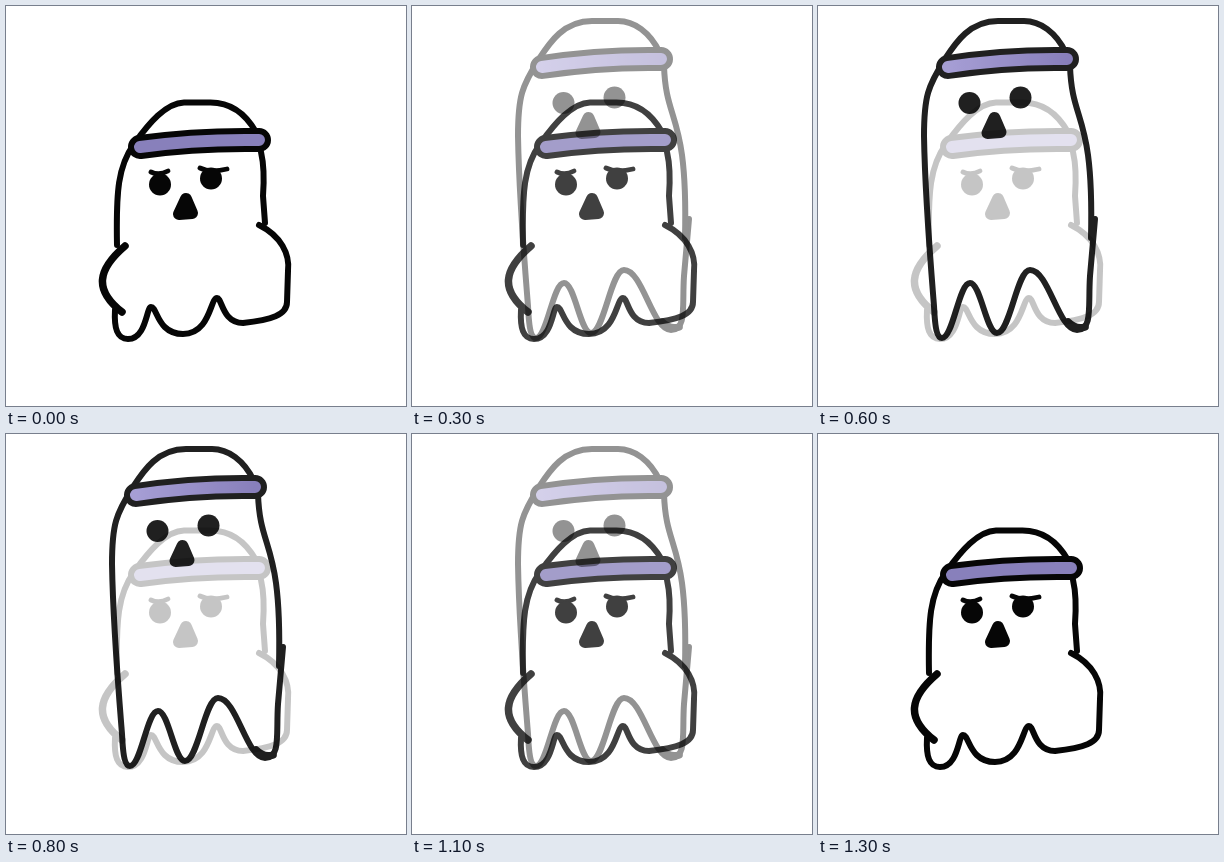
Animation of 400 by 400 pixels, one loop 1.5 s. Source, as an HTML page:

```html
<!DOCTYPE html>
<html lang="en">
<head>
<meta charset="utf-8">
<title>Ghost</title>
<style>
html, body { margin: 0; width: 100%; height: 100%; overflow: hidden; background: #fff; }
svg { display: block; width: 100vw; height: 100vh; }
path { fill: none; stroke: #060606; stroke-width: 6; stroke-linecap: round; stroke-linejoin: round; }
circle { fill: #060606; }
.thick { stroke-width: 7.5; }
.brow { stroke-width: 4.8; }
.rim { stroke-width: 24; }
.cloth { stroke-width: 12; }
.mouth { fill: #060606; stroke-width: 12; }
</style>
</head>
<body>
<svg viewBox="0 0 400 400">
  <defs>
    <linearGradient id="shine">
      <stop offset="0" stop-color="#9c93d0"/>
      <stop offset="1" stop-color="#7b71b4"/>
    </linearGradient>
  </defs>
  <g id="short"></g>
  <g id="tall"></g>
</svg>
<script>
const NS = 'http://www.w3.org/2000/svg';

function add(parent, tag, attrs) {
  const el = document.createElementNS(NS, tag);
  for (const key in attrs) el.setAttribute(key, attrs[key]);
  parent.append(el);
}

// Wavy hem through alternating feet and notches, level at each of them.
function hem(points, footWidth, notchWidth) {
  return points.slice(1).map(([x, y], i) => {
    const [px, py] = points[i];
    const dx = x - px;
    const [from, to] = i % 2 ? [notchWidth, footWidth] : [footWidth, notchWidth];
    return `C${px + dx * from} ${py} ${x - dx * to} ${y} ${x} ${y}`;
  }).join('');
}

function drawGhost(id, ghost) {
  const g = document.getElementById(id);
  const stroke = (d, kind = '', color = '#060606') =>
    add(g, 'path', { d, class: kind, style: 'stroke:' + color });

  ghost.outline.forEach(d => stroke(d));
  ghost.thick.forEach(d => stroke(d, 'thick'));
  ghost.brows.forEach(d => stroke(d, 'brow'));
  stroke(ghost.band, 'rim');
  stroke(ghost.band, 'cloth', ghost.color);
  for (const [cx, cy] of ghost.eyes) add(g, 'circle', { cx, cy, r: 11 });
  stroke(`M${ghost.mouth} l6 14 l-13 1 z`, 'mouth');
  return g;
}

const short = drawGhost('short', {
  outline: [
    'M111 239 C110 185 112 160 128 138 C143 117 160 97 178 96.5 H203 C222 96 238 105 250 126',
    'M255 146 Q259 163 257 190 L259 217',
    'M109 304 C108 322 111 333 122 333' +
      hem([[122, 333], [145, 301], [177, 328], [211, 292], [237, 317]], 0.8, 0.2) +
      'C265 314 281 309 281 296 L282 265 C284 248 275 230 253 219'
  ],
  thick: ['M119 240 C91 264 88 284 116 306'],
  brows: ['M145 166 Q153 170 162 165', 'M194 162 Q204 167 221 163'],
  band: 'M134 141 Q190 133 253 134',
  color: '#8880bb',
  eyes: [[154, 178.5], [205, 172.5]],
  mouth: [180, 193]
});

const tall = drawGhost('tall', {
  outline: [
    'M248 47 C238 26 222 15 206 15 H180 C152 15 138 36 127 53 C110 80 106 90 106 130' +
      'C107 190 112 250 116 300 C117 322 119 332 124 332' +
      hem([[124, 332], [152, 277], [179, 327], [212, 264], [259, 324]], 0.4, 0.4) +
      'C275 324 270 300 272 270 L277 213',
    'M252 60 C254 120 276 105 273 232'
  ],
  thick: ['M250 316 Q258 324 267 321'],
  brows: [],
  band: 'M130 61 Q188 52 249 53',
  color: 'url(#shine)',
  eyes: [[151.5, 97], [202.5, 91.5]],
  mouth: [176.5, 112]
});

// Stepped cross-fade there and back.
const LOOP = 1500, STEP = 100, FADE = 600;
const ease = p => p * (1.45 - 0.45 * p);

function progress(time) {
  const rise = (time - 100) / FADE;
  const fall = (1300 - time) / FADE;
  return Math.max(0, Math.min(1, rise, fall));
}

function fade(el, opacityAt) {
  const frames = [];
  for (let time = 0; time <= LOOP; time += STEP)
    frames.push({ offset: time / LOOP, opacity: opacityAt(progress(time)), easing: 'step-end' });
  el.animate(frames, { duration: LOOP, iterations: Infinity }).startTime = 0;
}

fade(short, p => ease(1 - p));
fade(tall, ease);
</script>
</body>
</html>
```
